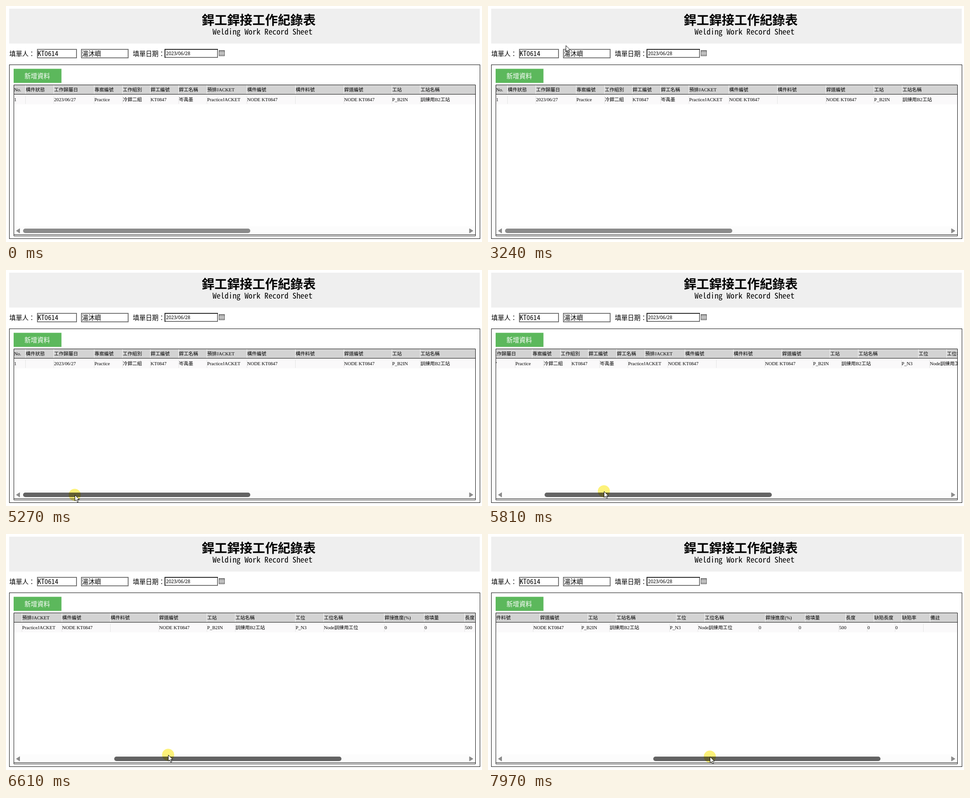
Recreate the animation shown at these times as an HTML page. Size 1060 by 528 pixels, loop 8 s.

```html
<!DOCTYPE html>
<html lang="zh-Hant">
<head>
<meta charset="utf-8">
<title>銲工銲接工作紀錄表</title>
<style>
html, body { margin: 0; width: 100%; height: 100%; overflow: hidden; background: #fff; }
svg { display: block; width: 1060px; height: 528px; }
text { white-space: pre; font-family: "Liberation Serif", "Noto Sans CJK TC", "Noto Sans CJK", serif; }
.cell { font-size: 10.67px; }
.label { font-size: 14.25px; }
.title { font: 700 28.2px "Noto Sans CJK TC", "Noto Sans CJK", sans-serif; }
.mono { font: 17.8px "Noto Sans Mono CJK TC", "Noto Sans CJK TC", monospace; }
.code { font-size: 15.3px; }
.date { font: 10.1px "Noto Sans", sans-serif; }
#halo { mix-blend-mode: multiply; }
</style>
</head>
<body>
<svg viewBox="0 0 1060 528">
  <defs>
    <clipPath id="view"><rect x="18" y="177" width="1027" height="43"/></clipPath>
  </defs>
  <rect width="1060" height="528" fill="#fff"/>
  <rect x="7" y="6" width="1048" height="78" fill="#efefef"/>
  <text class="title" x="436" y="41.5">銲工銲接工作紀錄表</text>
  <text class="mono" x="460" y="63.5">Welding Work Record Sheet</text>

  <text class="label" x="7.5" y="111.5">填單人：</text>
  <g fill="#fff" stroke="#767676" stroke-width="2">
    <rect x="70" y="97" width="87" height="19"/>
    <rect x="168" y="97" width="104" height="19"/>
    <rect x="354" y="97" width="117" height="18"/>
  </g>
  <path d="M354 116V97H472" fill="none" stroke="#2b2b2b" stroke-width="2"/>
  <text class="mono code" x="70.5" y="112">KT0614</text>
  <text class="label" x="169" y="111.5">湯沐嶼</text>
  <text class="label" x="282.5" y="111.5">填單日期：</text>
  <text class="date" x="356.5" y="110">2023/06/28</text>
  <rect x="474.5" y="99.5" width="12" height="12" fill="#fff" stroke="#444"/>
  <path d="M475 101.5h11" stroke="#777" stroke-width="2"/>
  <path d="M475 104.5h11M475 107.5h11M475 109.5h11M477.5 103v8M480.5 103v8M483.5 103v8" stroke="#8d8d8d"/>

  <rect x="7.5" y="131.5" width="1048" height="389" fill="none" stroke="#111"/>
  <rect x="17" y="140.5" width="106.5" height="31.5" fill="#5cb85c"/>
  <text class="label" x="41" y="162" fill="#fff">新增資料</text>

  <rect x="18" y="177" width="1027" height="20" fill="#d3d3d3"/>
  <rect x="18" y="198" width="1027" height="22" fill="#faf9fa"/>
  <g clip-path="url(#view)">
    <g id="head"></g>
    <g id="row"></g>
  </g>
  <rect x="18" y="493" width="1027" height="18" fill="#fcfcfc"/>
  <path d="M17.5 514.5V176.5H1045.5V514.5ZM17.5 197.5H1045.5M17.5 511.5H1045.5" fill="none" stroke="#111"/>
  <path d="M30.5 498v10l-7.5-5ZM1032 498v10l8-5Z" fill="#8b8b8b" stroke="#8b8b8b" stroke-linejoin="round"/>
  <rect id="thumb" y="498" width="506" height="10" rx="5"/>

  <circle id="halo" r="13.5" fill="#fdf27a"/>
  <path id="pointer" d="M.5 .5V14L3.6 11.2L6 16.7L8.2 15.7L5.8 10.3H10.2Z" fill="#fff" stroke="#111" stroke-linejoin="round"/>
</svg>
<script>
const LOOP = 8000, SHOW = 270, PRESS = 4740, STEP = 67.3;
const THUMB_LEFT = 38, SCROLL_RATIO = 1028 / 506;
const $ = id => document.getElementById(id);

// width, heading, value
const columns = [
  [30, 'No.', '1'], [70, '構件狀態', ''], [100, '工作歸屬日', '2023/06/27'],
  [70, '專案編號', 'Practice'], [70, '工作組別', '冷銲二組'], [70, '銲工編號', 'KT0847'],
  [70, '銲工名稱', '岑禹墨'], [100, '預排JACKET', 'PracticeJACKET'],
  [120, '構件編號', 'NODE KT0847'], [120, '構件料號', ''], [120, '銲道編號', 'NODE KT0847'],
  [70, '工站', 'P_B2IN'], [150, '工站名稱', '訓練用B2工站'], [70, '工位', 'P_N3'],
  [150, '工位名稱', 'Node訓練用工位'], [100, '銲接進度(%)', '0'], [100, '熔填量', '0'],
  [70, '長度', '500'], [70, '缺陷長度', '0'], [70, '缺陷率', '0'], [70, '備註', '']
];

function fill(id, field, top, baseline, line) {
  let left = 0;
  $(id).innerHTML = columns.map(column => {
    const x = Math.floor(18 + left * 0.8965);
    const rule = left ? `<rect x="${x - 1}" y="${top}" width="1" height="20" fill="${line}"/>` : '';
    left += column[0];
    return `${rule}<text class="cell" x="${x}" y="${baseline}">${column[field]}</text>`;
  }).join('');
}
fill('head', 1, 177, 191.3, '#f6f6f6');
fill('row', 2, 199, 212.7, '#e4e4e4');

// Monotone cubic through [time, value] keys
function track(keys) {
  const n = keys.length - 1;
  const slope = i => (keys[i + 1][1] - keys[i][1]) / (keys[i + 1][0] - keys[i][0]);
  const tangent = keys.map((_, i) => {
    const a = slope(Math.max(i - 1, 0)), b = slope(Math.min(i, n - 1));
    return a * b <= 0 ? 0 : 2 * a * b / (a + b);
  });
  return t => {
    if (t <= keys[0][0]) return keys[0][1];
    if (t >= keys[n][0]) return keys[n][1];
    const i = keys.findIndex(key => key[0] > t) - 1;
    const [t0, v0] = keys[i], [t1, v1] = keys[i + 1];
    const h = t1 - t0, u = (t - t0) / h, w = 1 - u;
    return w * w * ((1 + 2 * u) * v0 + u * h * tangent[i]) +
           u * u * ((3 - 2 * u) * v1 - w * h * tangent[i + 1]);
  };
}

// time, x, y of the pointer tip
const path = [
  [270, 190, 510], [620, 155, 317], [820, 155, 317], [1300, 20, 176], [1570, 36, 141],
  [1710, 66, 115], [2410, 514, 58], [2750, 612, 26], [3240, 152, 97], [3420, 128, 150],
  [4050, 338, 336], [4530, 153, 503], [5250, 153, 503], [5810, 258, 495],
  [6385, 361, 494], [6620, 361, 494], [7490, 446, 498], [7970, 494, 498]
];
const pointerX = track(path.map(p => [p[0], p[1]]));
const pointerY = track(path.map(p => [p[0], p[2]]));

const snap = t => Math.min(t, PRESS + Math.floor((t - PRESS) / STEP + 0.25) * STEP);

// Drag distance as seen by a part that follows the pointer with a delay
const drag = (t, lag) => Math.max(0, pointerX(Math.max(PRESS, t - lag)) - pointerX(PRESS) - 5);

function draw(time) {
  const t = snap(time), x = pointerX(t), y = pointerY(t), pressed = time >= PRESS;
  const move = (id, dx, dy = 0) =>
    $(id).setAttribute('transform', `translate(${Math.round(dx)} ${Math.round(dy)})`);
  const show = (id, on) => $(id).setAttribute('visibility', on ? 'visible' : 'hidden');

  move('pointer', x, y);
  move('halo', x, y);
  move('thumb', THUMB_LEFT + drag(t, 60));
  move('row', -SCROLL_RATIO * drag(t, 150));
  move('head', -SCROLL_RATIO * drag(t, 225));
  show('pointer', time >= SHOW);
  show('halo', pressed);
  const hover = time > 4050 && y >= 498;
  $('thumb').setAttribute('fill', pressed || hover ? '#636363' : '#8b8b8b');
}

const begin = performance.now();
function tick() {
  draw((performance.now() - begin) % LOOP);
  requestAnimationFrame(tick);
}
tick();
</script>
</body>
</html>
```
